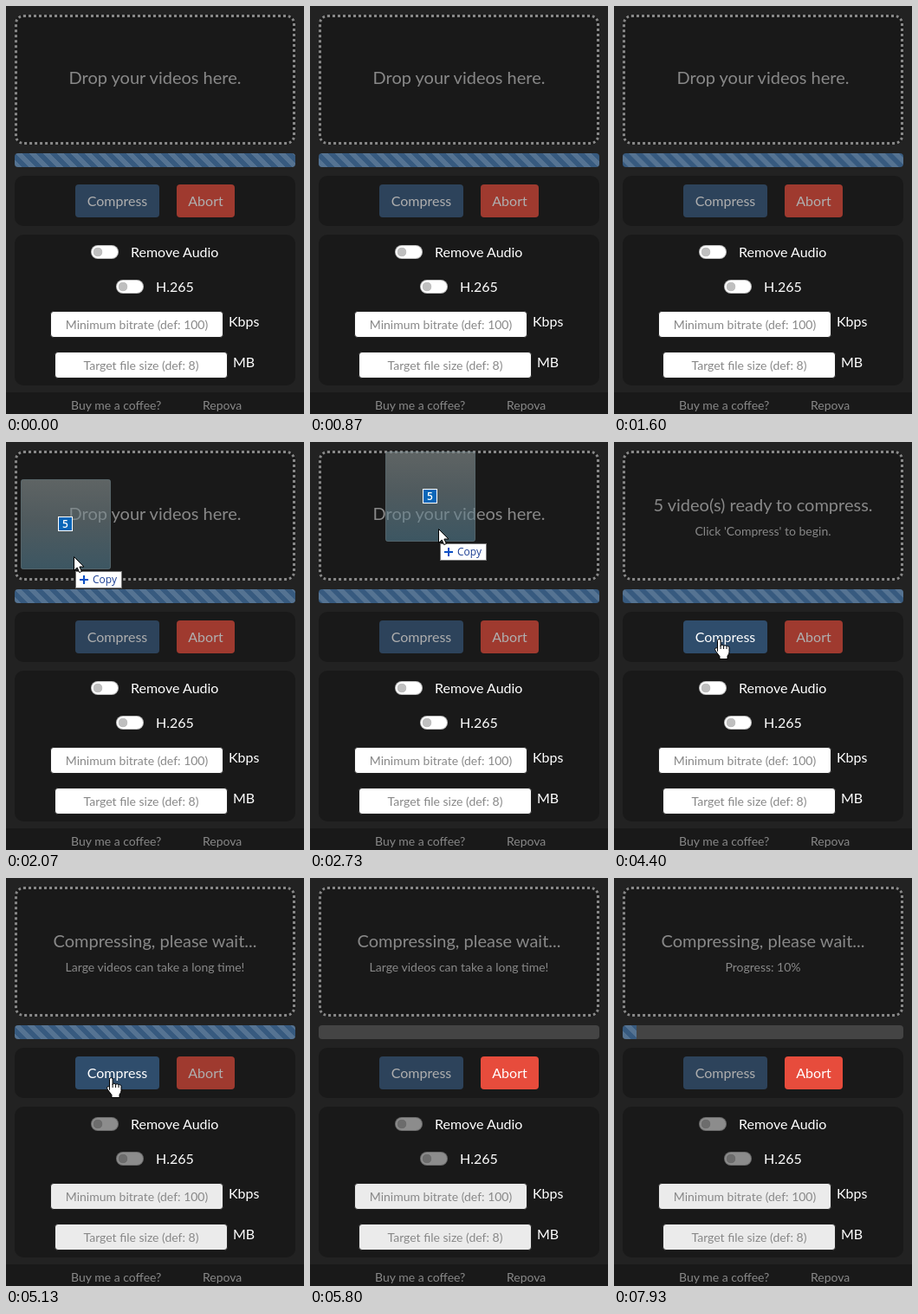
Animation, 344 px wide and 471 px high, one loop 8000 ms. Source, as an HTML page:

```html
<!DOCTYPE html>
<html lang="en">
<head>
<meta charset="utf-8">
<title>Video compressor</title>
<style>
* { box-sizing: border-box; }
html, body { margin: 0; width: 100%; height: 100%; overflow: hidden; background: #222; }
#stage { position: relative; width: 344px; height: 471px; overflow: hidden; background: #222;
  font: 16px/24px Lato, sans-serif; color: #fff; }
#stage > * { position: absolute; white-space: nowrap; }
.panel { left: 10px; width: 324px; background: #191919; border-radius: 10px; }
#drop { top: 10px; height: 150px; border: 3px dotted #888; }
.line { left: 0; width: 344px; text-align: center; color: #888; }
#title { font-size: 20px; }
#note { top: 92px; font-size: 14px; line-height: 21px; }
#track { left: 10px; top: 170px; width: 324px; height: 16px; border-radius: 4px; background: #444; overflow: hidden; }
#bar { height: 16px; background: #375a7f linear-gradient(45deg, rgba(255,255,255,.15) 25%, transparent 25% 50%,
  rgba(255,255,255,.15) 50% 75%, transparent 75%) 0 0 / 16px 16px; }
.btn { top: 206px; height: 38px; padding-top: 7px; border-radius: 4px; text-align: center; }
#compress { left: 80px; width: 97px; }
#abort { left: 197px; width: 67px; background: #e74c3c; }
.switch { width: 32px; height: 16px; border-radius: 8px; border: 1px solid rgba(0,0,0,.25);
  background: #fff radial-gradient(circle at 7px 7px, #bfbfbf 5px, transparent 5.6px); }
.field { width: 200px; height: 31px; border: 1px solid #222; border-radius: 4px; color: #888;
  font-size: 14px; line-height: 29px; text-align: center; }
#footer { left: 0; top: 446px; width: 344px; height: 25px; background: #191919; }
.link { top: 450px; font-size: 14px; line-height: 21px; color: #888; }
#overlay { left: 0; top: 0; }
</style>
</head>
<body>
<div id="stage">
  <div id="drop" class="panel"></div>
  <div id="title" class="line"></div>
  <div id="note" class="line"></div>
  <div id="track"><div id="bar"></div></div>
  <div class="panel" style="top:196px;height:58px"></div>
  <div id="compress" class="btn">Compress</div>
  <div id="abort" class="btn">Abort</div>
  <div class="panel" style="top:264px;height:174px"></div>
  <div class="switch" style="left:98px;top:276px"></div>
  <div style="left:144px;top:272px">Remove Audio</div>
  <div class="switch" style="left:127px;top:316px"></div>
  <div style="left:173px;top:312px">H.265</div>
  <div class="field" style="left:51px;top:352px">Minimum bitrate (def: 100)</div>
  <div style="left:257px;top:352px">Kbps</div>
  <div class="field" style="left:56px;top:399px">Target file size (def: 8)</div>
  <div style="left:262px;top:399px">MB</div>
  <div id="footer"></div>
  <div class="link" style="left:75px">Buy me a coffee?</div>
  <div class="link" style="left:227px">Repova</div>
  <svg id="overlay" width="344" height="471">
    <defs>
      <linearGradient id="sheet" x2="0" y2="1">
        <stop offset="0" stop-color="#8d9696"/><stop offset=".45" stop-color="#74868c"/><stop offset="1" stop-color="#547f93"/>
      </linearGradient>
    </defs>
    <g id="pointer">
      <g id="ghost">
        <rect x="-60.5" y="-88.5" width="103" height="103" rx="2" fill="url(#sheet)" fill-opacity=".6" stroke="#6d8087" stroke-opacity=".6"/>
        <rect x="-17.5" y="-45.5" width="16" height="16" fill="#0a66b8" stroke="#fff"/>
        <text x="-9.5" y="-33" text-anchor="middle" font-family="Open Sans, sans-serif" font-size="12" font-weight="600" fill="#fff">5</text>
        <rect x="2.5" y="17.5" width="53" height="19" fill="#fff" stroke="#767676"/>
        <path d="M7 27h10M12 22v10" stroke="#0a4fc4" stroke-width="2"/>
        <text x="22" y="31" font-family="Open Sans, sans-serif" font-size="12" fill="#1c3f94">Copy</text>
      </g>
      <path id="arrow" d="M.5 .5v16l3.7-3.5 2.5 5.6 2.7-1.2-2.5-5.4h5z" fill="#fff" stroke="#000"/>
      <path id="beam" d="M-3.5-7.5h2.5l1 1 1-1h2.5M-3.5 7.5h2.5l1-1 1 1h2.5M0-6.5v13" fill="none" stroke="#fff"/>
      <g id="hand" stroke="#000" stroke-linejoin="round">
        <path d="M-1.5 13.5V1.5q0-2 1.8-2t1.8 2v6q0-1.3 1.7-1.3t1.8 1.6q.2-1 1.7-1t1.7 1.7q.3-.8 1.5-.8t1.5 1.7v5.1q0 2-2 4.5v3.5h-9v-3l-4.500-6q-1.700-2.500-.5-3.500t2.500.5z" fill="#fff"/>
        <path d="M2.100 7v4M5.600 8v3M9 9v2" fill="none"/>
      </g>
    </g>
  </svg>
</div>
<script>
const LOOP = 8000, DROP = 2900, CLICK = 5130, SHRINK = 5182, GROW = 7760, PROGRESS = 7800, FULL = 324;
const $ = id => document.getElementById(id);
const switches = document.querySelectorAll('.switch');
const fields = document.querySelectorAll('.field');
const clamp = x => Math.min(1, Math.max(0, x));
const mix = (a, b, p) => a + (b - a) * p;

// CSS "ease": cubic-bezier(.25, .1, .25, 1)
function ease(x) {
  if (x <= 0 || x >= 1) return clamp(x);
  const curve = (a, b, s) => 3 * a * s * (1 - s) ** 2 + 3 * b * s * s * (1 - s) + s ** 3;
  let low = 0, high = 1;
  for (let i = 0; i < 24; i++) {
    const mid = (low + high) / 2;
    if (curve(.25, .25, mid) < x) low = mid; else high = mid;
  }
  return curve(.1, 1, low);
}

const path = [
  [1790, -44, 151], [2070, 78, 132], [2470, 140, 104], [2670, 148, 100], [2900, 148, 100],
  [3200, 148, 105], [3540, 148, 105], [3860, 142, 145], [4300, 121, 228], [4800, 121, 228], [5000, 121, 231]
];
function pointerAt(t) {
  const i = path.findIndex(p => p[0] > t);
  if (i < 0) return path[path.length - 1].slice(1);
  if (i === 0) return [-200, 0];
  const [a, b] = [path[i - 1], path[i]];
  const p = (t - a[0]) / (b[0] - a[0]);
  return [Math.round(mix(a[1], b[1], p)), Math.round(mix(a[2], b[2], p))];
}

const colors = { disabled: [45, 67, 91, 174], ready: [55, 90, 127, 255], hover: [47, 77, 108, 255] };
function paintCompress(from, to, p) {
  const [r, g, b, ink] = colors[from].map((v, i) => mix(v, colors[to][i], ease(p)));
  $('compress').style.background = `rgb(${r},${g},${b})`;
  $('compress').style.color = `rgb(${ink},${ink},${ink})`;
}

function barWidth(t) {
  if (t >= GROW) return .1 * FULL * ease((t - GROW) / 600);
  return FULL * (1 - ease((t - SHRINK) / 600));
}

function message(t) {
  if (t < DROP) return ['Drop your videos here.', ''];
  if (t < CLICK) return ['5 video(s) ready to compress.', "Click 'Compress' to begin."];
  return ['Compressing, please wait...', t < PROGRESS ? 'Large videos can take a long time!' : 'Progress: 10%'];
}

function drawPointer(t) {
  const [x, y] = pointerAt(t);
  const shape = t < DROP ? 'arrow' : y < 113 ? 'beam' : y < 206 || t >= CLICK + 60 ? 'arrow' : 'hand';
  for (const id of ['arrow', 'beam', 'hand']) $(id).style.display = id === shape ? '' : 'none';
  $('ghost').style.display = t < DROP ? '' : 'none';
  $('pointer').style.display = t >= 1795 && t < 5400 ? '' : 'none';
  const half = shape === 'beam' ? .5 : 0;
  $('pointer').setAttribute('transform', `translate(${x + half} ${y})`);
}

function render(t) {
  const [title, note] = message(t);
  $('title').textContent = title;
  $('note').textContent = note;
  $('title').style.top = (note ? 60 : 70) + 'px';

  $('bar').style.width = barWidth(t) + 'px';
  $('bar').style.backgroundPositionX = 16 * (1 - t / 1000 % 1) + 'px';

  if (t < CLICK) {
    if (t < 4190) paintCompress('disabled', 'ready', (t - DROP) / 150);
    else paintCompress('ready', 'hover', (t - 4190) / 150);
  } else paintCompress('hover', 'disabled', (t - CLICK) / 150);

  const busy = t >= CLICK;
  $('abort').style.opacity = mix(.65, 1, ease((t - CLICK) / 150));
  switches.forEach(s => s.style.opacity = busy ? .5 : 1);
  fields.forEach(f => f.style.background = busy ? '#ebebeb' : '#fff');
  drawPointer(t);
}

// The screen refreshes 15 times a second, on 10 ms ticks.
function snap(t) {
  const step = Math.round(t * .015);
  const tick = n => Math.round(n * 20 / 3) * 10;
  return tick(tick(step) > t ? step - 1 : step);
}

const start = performance.now();
function loop() {
  render(snap((performance.now() - start) % LOOP));
  requestAnimationFrame(loop);
}
render(0);
loop();
</script>
</body>
</html>
```
